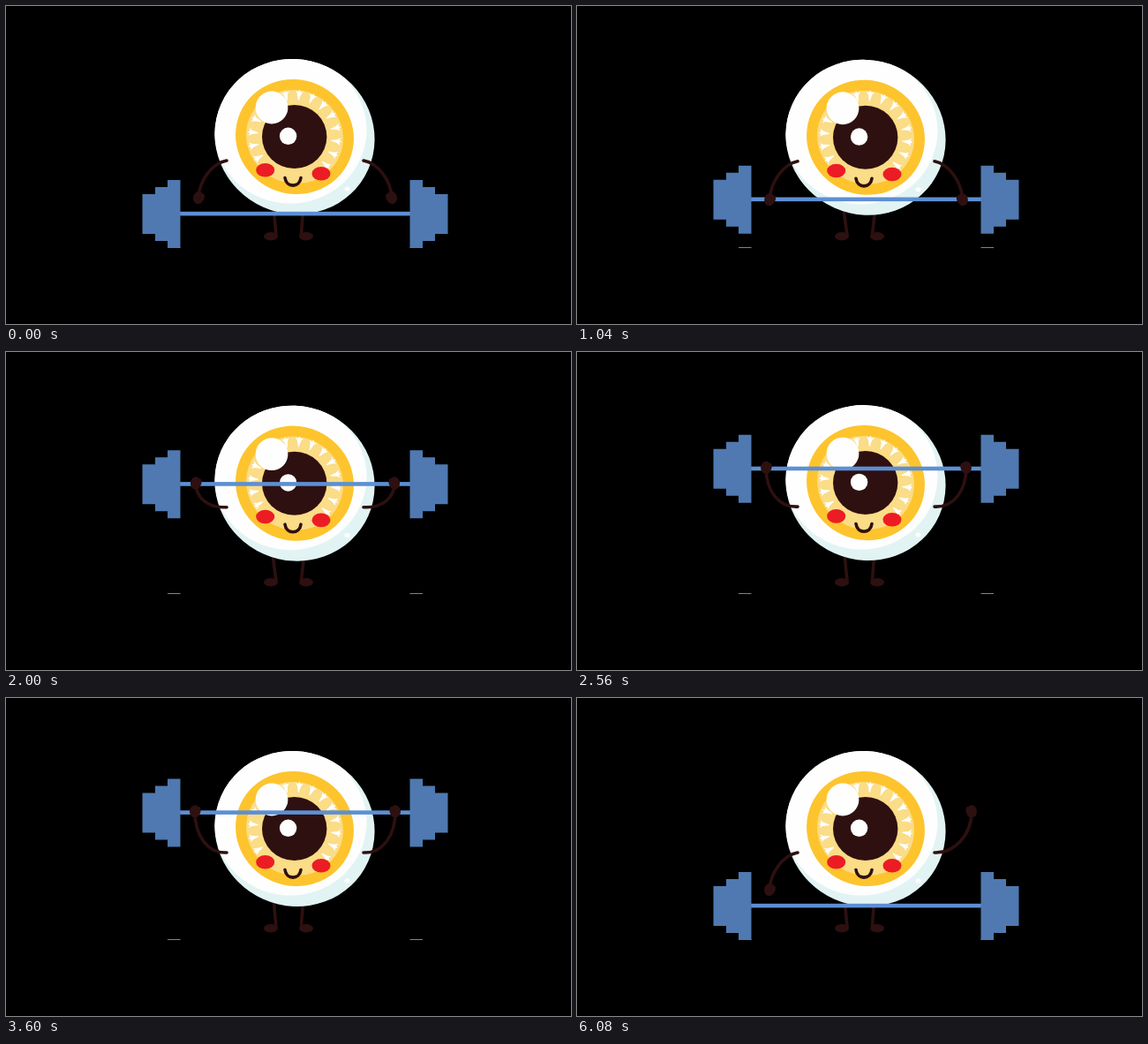
Recreate the animation shown at these times as an HTML page. Size 640 by 360 pixels, loop 6160 ms.

```html
<!DOCTYPE html>
<html lang="en">
<head>
<meta charset="utf-8">
<title>Eyeball lifting a barbell</title>
<style>
  html, body { margin: 0; width: 100%; height: 100%; overflow: hidden; background: #000; }
  svg { display: block; width: 100vw; height: 100vh; }
  .limb { fill: none; stroke: #2e1010; stroke-width: 3.6; stroke-linecap: round; }
  .dark { fill: #2e1010; }
  .white { fill: #fefefe; }
  .plate { fill: #4f79b0; }
  .cheek { fill: #ec1c24; }
</style>
</head>
<body>
<svg viewBox="0 0 640 360">
  <defs>
    <clipPath id="ball"><ellipse cx="327" cy="148" rx="91.2" ry="87.3" transform="rotate(24 327 148)"/></clipPath>
    <path id="ray" d="M5 0L2.5 1.3L3.5 4.5L0 2.2L-7 .5V-.5L0 -2.2L3.5 -4.5L2.5 -1.3Z"/>
    <path id="plates" class="plate" d="M154.5 213H169V205H183V197H197.5V274H183V266H169V258H154.5Z"/>
    <g id="fist" class="dark">
      <ellipse rx="6" ry="7.2"/>
      <ellipse cx="4.2" cy="-1.5" rx="2.4" ry="4"/>
    </g>
  </defs>

  <path d="M183 273.5H197.5M457.5 273.5H472" stroke="#808286"/>

  <path id="legL" class="limb"/>
  <path id="legR" class="limb"/>
  <g class="dark">
    <ellipse cx="300" cy="260.7" rx="8" ry="4.7"/>
    <ellipse cx="340" cy="260.7" rx="8" ry="4.7"/>
  </g>

  <g id="body">
    <g clip-path="url(#ball)">
      <rect x="230" y="50" width="200" height="200" fill="#e2f3f3"/>
      <ellipse class="white" cx="322" cy="140.5" rx="86.5" ry="83"/>
      <ellipse class="white" cx="386.5" cy="207" rx="3" ry="2.6"/>
    </g>
    <g transform="rotate(24 327 148)">
      <ellipse cx="327" cy="148" rx="67.4" ry="64.6" fill="#fdc42d"/>
      <ellipse cx="327" cy="148" rx="55.4" ry="52.6" fill="#fbdc87"/>
    </g>
    <g id="rays" class="white"></g>
    <ellipse class="dark" cx="326.7" cy="148" rx="36.7" ry="36"/>
    <circle class="white" cx="301" cy="115" r="18.4"/>
    <circle class="white" cx="319.6" cy="147.3" r="9.7"/>
    <ellipse class="cheek" cx="293.7" cy="185.8" rx="10.5" ry="7.8"/>
    <ellipse class="cheek" cx="357" cy="189.7" rx="10.5" ry="7.8"/>
    <path class="limb" d="M316 194.5C317.5 206 332.5 206 334 194.5"/>
  </g>

  <g id="bar">
    <rect x="197" y="232.8" width="261" height="4.6" fill="#5d8fd3"/>
    <use href="#plates"/>
    <use href="#plates" transform="translate(655 0) scale(-1 1)"/>
  </g>

  <g id="armL"><path class="limb"/><use href="#fist"/></g>
  <g transform="translate(655 0) scale(-1 1)">
    <g id="armR"><path class="limb"/><use href="#fist"/></g>
  </g>
</svg>

<script>
const LOOP = 6160, STEP = 80;
const GRAB = 400, STAND = 1200, PRESS = 1320, LOWER = 3600, DOWN = 4000, WAVE = 4560;
const PRESSES = 4.5, WAVE_PERIOD = 507;

const $ = id => document.getElementById(id);
const mix = (a, b, u) => a + (b - a) * u;
const part = (t, from, to) => Math.min(1, Math.max(0, (t - from) / (to - from)));
const swing = turns => (1 - Math.cos(2 * Math.PI * turns)) / 2;
const ease = (t, from, to) => swing(part(t, from, to) / 2);

for (let a = 150; a <= 402; a += 18) {
  const ray = document.createElementNS("http://www.w3.org/2000/svg", "use");
  ray.setAttribute("href", "#ray");
  ray.setAttribute("transform", `translate(327 148) rotate(${a}) translate(48.5 0)`);
  $("rays").append(ray);
}

// up: 0 = arm hanging, 1 = arm raised; reach stretches it down to the floor
function drawArm(arm, up, reach, dip, handX, turn) {
  const sy = 175 + dip;
  const x = mix(218, handX, up) + 2 * reach;
  const y = mix(217, 128.5, up) + 21.6 * reach;
  const c1 = `${mix(233, 228, up)} ${sy + mix(3, 1, up) + 4 * reach}`;
  const c2 = `${x + mix(1, 0, up)} ${y + mix(-19, 27, up)}`;
  arm.children[0].setAttribute("d", `M250 ${sy}C${c1} ${c2} ${x} ${y}`);
  arm.children[1].setAttribute("transform", `translate(${x} ${y}) rotate(${mix(12, 0, up)})`);
  arm.setAttribute("transform", `rotate(${-turn} 250 ${sy})`);
}

function draw(t) {
  const stand = ease(t, GRAB, STAND);
  const crouch = ease(t, 0, GRAB) - stand;
  const press = swing(PRESSES * part(t, PRESS, LOWER));
  const hold = 1 - ease(t, LOWER, DOWN);
  const up = press * hold;
  const lift = 18 * stand * hold + 87.5 * up;
  const dip = 8 * crouch + 3 * (1 - press) * ease(t, PRESS, PRESS + 250);
  const greet = ease(t, DOWN, WAVE - STEP);
  const turn = t < WAVE ? 0 : 18 * swing((t - WAVE) / WAVE_PERIOD);
  const spread = 1.4 * dip;

  $("body").setAttribute("transform", `translate(0 ${dip})`);
  $("bar").setAttribute("transform", `translate(0 ${-lift})`);
  $("legL").setAttribute("d", `M${303.5 - spread} ${232 + dip}Q${305 - spread / 2} 249 306 259`);
  $("legR").setAttribute("d", `M${336.5 + spread} ${232 + dip}Q${335 + spread / 2} 249 334.5 259`);
  drawArm($("armL"), up, crouch, dip, 214, 0);
  drawArm($("armR"), Math.max(up, greet), crouch, dip, mix(214, 208, greet), turn);
}

const start = performance.now();
function tick() {
  const t = (performance.now() - start) % LOOP;
  draw(Math.floor(t / STEP) * STEP);
  requestAnimationFrame(tick);
}
tick();
</script>
</body>
</html>
```
